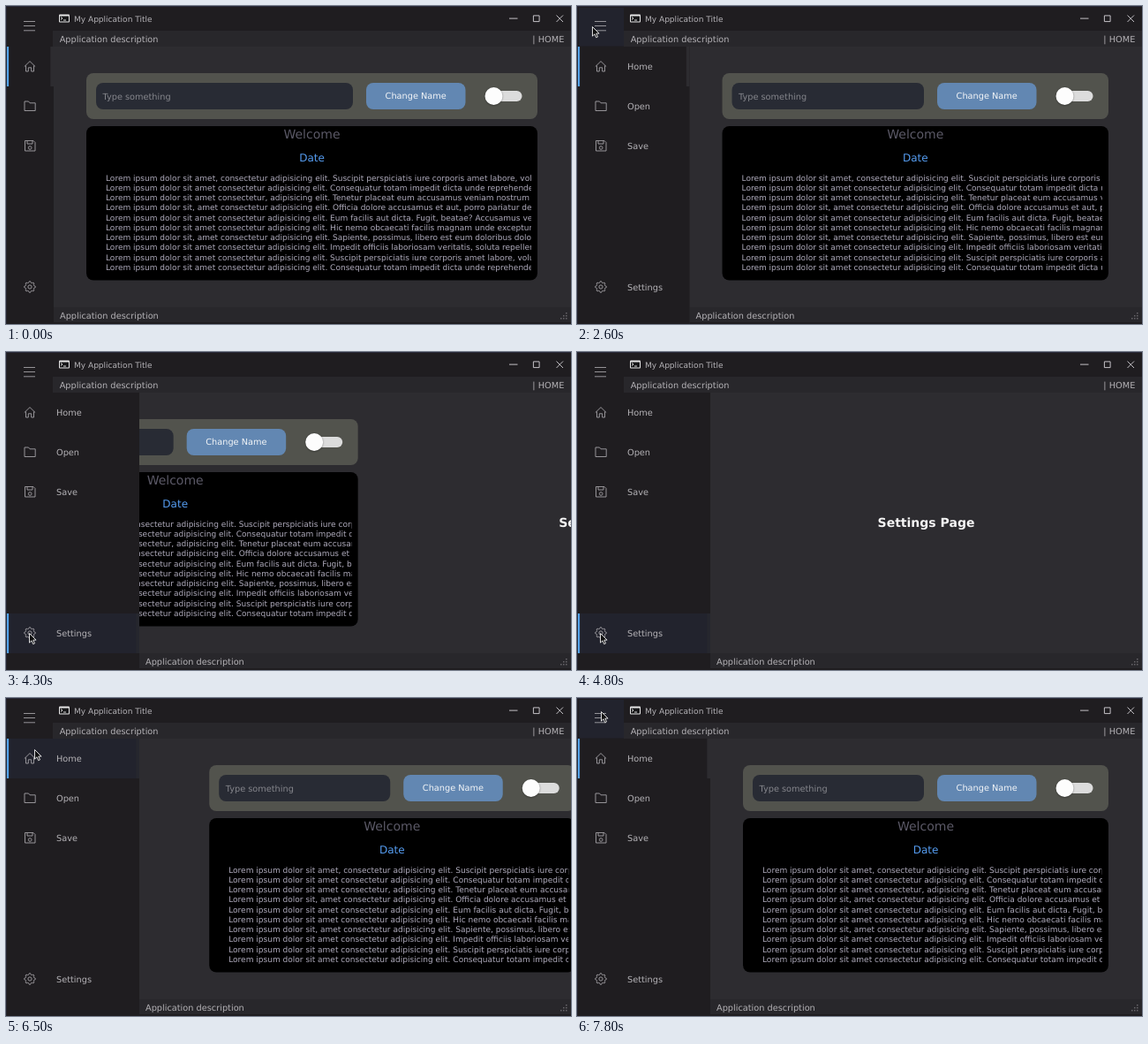
Animation of 640 by 360 pixels, one loop 8 s. Source, as an HTML page with a canvas:

```html
<!DOCTYPE html>
<html lang="en">
<head>
<meta charset="utf-8">
<title>Application window</title>
<style>
html, body { margin: 0; width: 100%; height: 100%; overflow: hidden; background: #2d2c30; }
canvas { display: block; width: 640px; height: 360px; }
</style>
</head>
<body>
<canvas id="stage" width="640" height="360"></canvas>
<script>
const ctx = document.getElementById('stage').getContext('2d');
const LOOP = 8000, STEP = 100, SLIDE = 500;
const CLOSED = 54, OPEN = 151;
const MENU_AT = 2221, SETTINGS_AT = 4249, HOME_AT = 6252;
const COLOR = {
  side: '#1f1d20', main: '#2d2c30', strip: '#28272b', hover: '#22232d', hoverEdge: '#26272e',
  accent: '#55a5f5', text: '#b4b2b6', icon: '#a3a1a5', edge: '#292a3a'
};
const ROWS = [
  { name: 'Home', y: 46, icon: houseIcon },
  { name: 'Open', y: 91, icon: folderIcon },
  { name: 'Save', y: 136, icon: diskIcon },
  { name: 'Settings', y: 296, icon: gearIcon }
];
const PLAIN = 'Lorem ipsum dolor sit amet consectetur adipisicing elit. ';
const COMMA = PLAIN.replace('sit amet', 'sit, amet');
const SUSCIPIT = 'Suscipit perspiciatis iure corporis amet labore, voluptas';
const CONSEQUATUR = 'Consequatur totam impedit dicta unde reprehenderit';
const LINES = [
  PLAIN.replace('amet', 'amet,') + SUSCIPIT,
  PLAIN + CONSEQUATUR,
  PLAIN.replace('consectetur', 'consectetur,') + 'Tenetur placeat eum accusamus veniam nostrum',
  COMMA + 'Officia dolore accusamus et aut, porro pariatur delectus',
  PLAIN + 'Eum facilis aut dicta. Fugit, beatae? Accusamus veniam',
  PLAIN + 'Hic nemo obcaecati facilis magnam unde excepturi',
  COMMA + 'Sapiente, possimus, libero est eum doloribus dolorem',
  PLAIN + 'Impedit officiis laboriosam veritatis, soluta repellendus',
  PLAIN + SUSCIPIT,
  PLAIN + CONSEQUATUR
];
// Pointer stops: time, x, y
const POINTER = [
  [1600, 36, 45], [2000, 17, 23], [2700, 17, 23], [3100, 22, 50],
  [4000, 26, 318], [4800, 26, 318], [5800, 32, 66], [6000, 32, 58],
  [7200, 32, 58], [7700, 27, 15]
];

const clamp = v => Math.min(1, Math.max(0, v));
const progress = (t, start) => clamp((t - start) / SLIDE);
const smooth = p => p * p * (3 - 2 * p);
function outBack(p) {
  const u = p - 1;
  return 1 + u * u * (2.70158 * u + 1.70158);
}

function rect(x, y, w, h, color) {
  ctx.fillStyle = color;
  ctx.fillRect(x, y, w, h);
}
function round(x, y, w, h, r, color) {
  ctx.fillStyle = color;
  ctx.beginPath();
  ctx.roundRect(x, y, w, h, r);
  ctx.fill();
}
function text(s, x, y, size = 9.75, color = COLOR.text, align = 'left', weight = '') {
  ctx.font = `${weight} ${size}px "DejaVu Sans", sans-serif`;
  ctx.textRendering = 'geometricPrecision';
  ctx.textAlign = align;
  ctx.fillStyle = color;
  ctx.fillText(s, x, y);
}
function lines(paths, color = COLOR.icon, width = 1) {
  ctx.strokeStyle = color;
  ctx.lineWidth = width;
  ctx.stroke(new Path2D(paths));
}
function clipped(x, y, w, h, draw) {
  ctx.save();
  ctx.beginPath();
  ctx.rect(x, y, w, h);
  ctx.clip();
  draw();
  ctx.restore();
}

function houseIcon() {
  lines('M20.8 68.6L27 62.6L33.2 68.6M22.5 67.4V74H25.3V69.8H28.7V74H31.5V67.4', COLOR.icon, 0.9);
}
function folderIcon() {
  lines('M21 118.5V108H25.5L27 109.8H33.2V118.5Z', COLOR.icon, 0.9);
}
function diskIcon() {
  lines('M21.5 152.5H31L33 154.5V164H21.5ZM24 152.5V156H30V152.5', COLOR.icon, 0.9);
  lines('M29 160.5A1.8 1.8 0 1 1 25.4 160.5A1.8 1.8 0 1 1 29 160.5', COLOR.icon, 0.9);
}
function gearIcon() {
  ctx.beginPath();
  for (let i = 0; i < 32; i++) {
    const a = (i - 0.5) * Math.PI / 16;
    const r = i % 4 < 2 ? 6.3 : 4.9;
    ctx.lineTo(27 + r * Math.cos(a), 318 + r * Math.sin(a));
  }
  ctx.closePath();
  ctx.moveTo(29.1, 318);
  ctx.arc(27, 318, 2.1, 0, 2 * Math.PI);
  ctx.strokeStyle = COLOR.icon;
  ctx.lineWidth = 0.9;
  ctx.stroke();
}

function homePage(left) {
  const shift = left - CLOSED, x = 91 + shift, w = 511 - shift, mid = x + w / 2;
  round(x, 76, w, 52, 8, '#52534d');
  round(x + 11, 87, 291 - shift, 30, 8, '#282b34');
  text('Type something', x + 18.5, 105.5, 9.75, '#85868c');
  round(408, 87, 112.5, 30, 8, '#6287b2');
  text('Change Name', 464.2, 105.3, 9.75, '#f4f6f8', 'center');
  round(545, 96, 39.5, 12, 6, '#dcdcdc');
  ctx.save();
  ctx.shadowColor = 'rgba(0,0,0,.45)';
  ctx.shadowBlur = 2;
  ctx.shadowOffsetY = 0.5;
  round(542.5, 92, 20, 20, 10, '#fdfdfd');
  ctx.restore();

  round(x, 136, w, 174.5, 8, '#000');
  text('Welcome', mid, 150.3, 14, '#5b5967', 'center');
  text('Date', mid, 175.6, 12, '#559cf0', 'center');
  clipped(x + 22, 186, 482 - shift, 118, () => {
    LINES.forEach((s, i) => text(s, x + 22, 197.6 + i * 11.25, 9.02, '#aeaabb'));
  });
}

function settingsPage(left) {
  text('Settings Page', (left + 640) / 2, 198, 14, '#f5f5f5', 'center', 'bold');
}

function pages(t, left) {
  const span = 640 - left;
  const shown = t < HOME_AT
    ? outBack(progress(t, SETTINGS_AT))
    : 1 - outBack(progress(t, HOME_AT));
  clipped(left, 46, span, 295, () => {
    ctx.translate(-shown * span, 0);
    homePage(left);
    ctx.translate(span, 0);
    settingsPage(left);
  });
}

function header(hovered) {
  rect(0, 0, 640, 46, COLOR.side);
  rect(53, 28, 587, 18, COLOR.strip);
  if (hovered) rect(2, 2, 51, 43.5, COLOR.hover);
  lines('M20 17.5H33M20 22.5H33M20 27.8H33', COLOR.icon, 0.9);
  round(60, 9.5, 12, 9, 1, '#e8e8e8');
  rect(61, 11.5, 10, 6, '#171719');
  lines('M62 12.5L64 14L62 15.5M65 16H68', '#e8e8e8', 0.9);
  text('My Application Title', 77, 18, 9.03);
  lines('M570 14.1H579.5M597.4 10.9H604.1V17.6H597.4ZM623.5 10.5L631 18M631 10.5L623.5 18', '#c4c2c6');
  text('Application description', 60.7, 40.5);
  text('| HOME', 632.3, 40.5, 9.75, COLOR.text, 'right');
}

function footer(left) {
  rect(left, 341, 640 - left, 17, COLOR.strip);
  rect(left, 358, 640 - left, 2, COLOR.side);
  text('Application description', left + 7, 353.6);
  for (let r = 0; r < 3; r++)
    for (let c = 0; c <= r; c++)
      rect(634 - c * 3, 347 + r * 3, 1.5, 1.5, '#67656a');
}

function sidebar(left, selected, pointer) {
  rect(0, 46, left, 314, COLOR.side);
  clipped(0, 46, left, 314, () => {
    for (const row of ROWS) {
      const over = pointer && pointer.y >= row.y && pointer.y < row.y + 45;
      if (over) rect(0, row.y, left, 45, COLOR.hover);
      if (row.name === selected) {
        rect(left - 3.7, row.y, 4, 45, over ? COLOR.hoverEdge : COLOR.main);
        rect(0.9, row.y, 2.2, 45, COLOR.accent);
      }
      row.icon();
      text(row.name, 57, row.y + 25.5);
    }
  });
}

function pointerAt(t) {
  if (t < POINTER[0][0]) return null;
  const i = POINTER.findIndex(p => p[0] > t);
  if (i < 0) {
    const [, x, y] = POINTER[POINTER.length - 1];
    return { x, y };
  }
  const [t0, x0, y0] = POINTER[i - 1], [t1, x1, y1] = POINTER[i];
  const p = smooth((t - t0) / (t1 - t0));
  return { x: x0 + (x1 - x0) * p, y: y0 + (y1 - y0) * p };
}

function drawPointer({ x, y }) {
  ctx.save();
  ctx.translate(x + 0.5, y + 0.5);
  const arrow = new Path2D('M0 0V10.6L2.5 8.3L4.2 12.2L6 11.4L4.3 7.6H7.6Z');
  ctx.fillStyle = '#111';
  ctx.fill(arrow);
  ctx.strokeStyle = '#f0f0f0';
  ctx.lineWidth = 0.9;
  ctx.stroke(arrow);
  ctx.restore();
}

function draw(t) {
  const left = CLOSED + (OPEN - CLOSED) * progress(t, MENU_AT);
  const selected = t >= SETTINGS_AT && t < HOME_AT ? 'Settings' : 'Home';
  const pointer = pointerAt(t);
  rect(0, 0, 640, 360, COLOR.main);
  pages(t, left);
  footer(left);
  header(pointer && pointer.y < 46);
  sidebar(left, selected, pointer);
  rect(0, 0, 640, 1, COLOR.edge);
  rect(0, 0, 0.7, 360, COLOR.edge);
  if (pointer) drawPointer(pointer);
}

const start = performance.now();
function tick() {
  const t = (performance.now() - start) % LOOP;
  draw(Math.floor(t / STEP) * STEP);
  requestAnimationFrame(tick);
}
tick();
</script>
</body>
</html>
```
